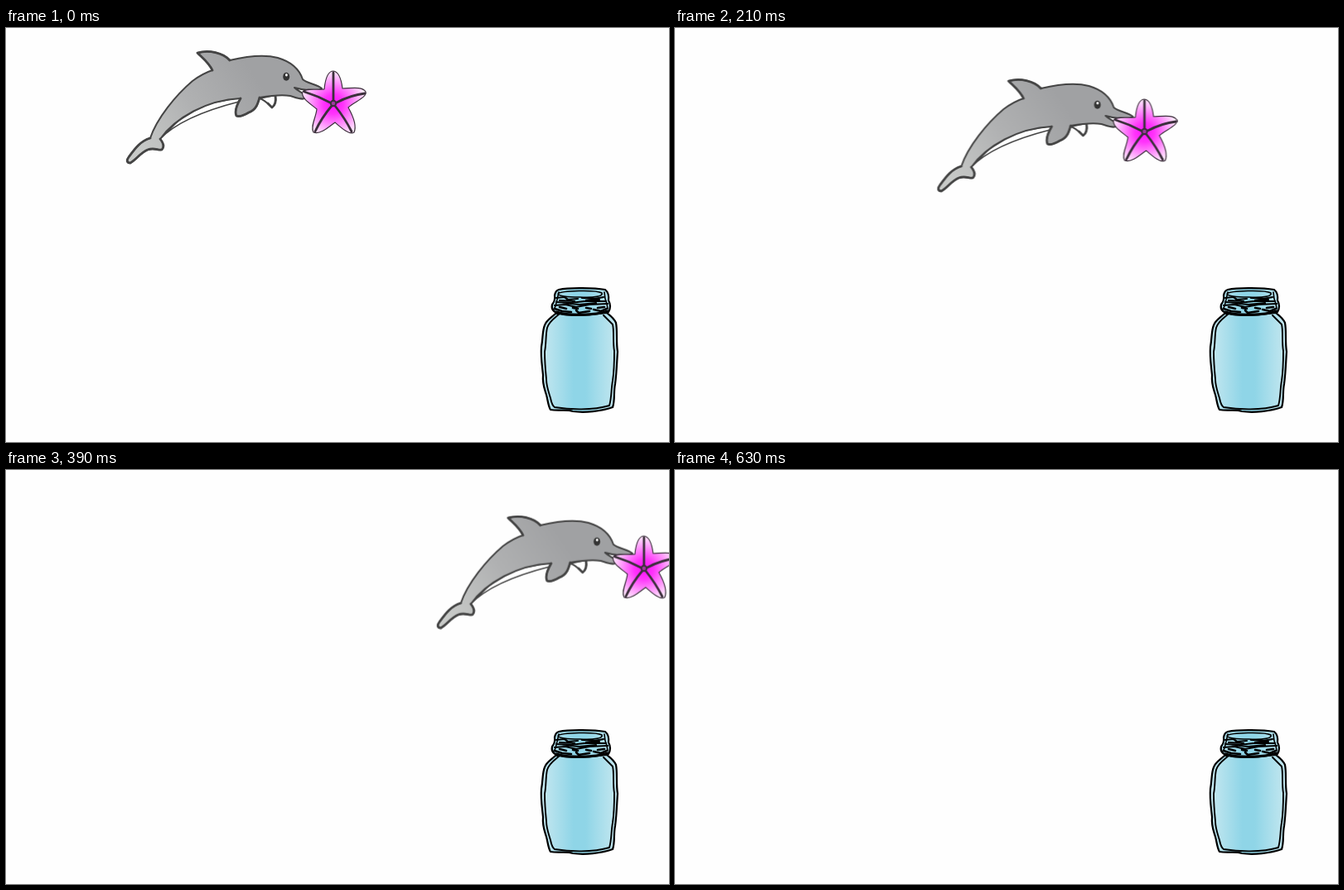
An HTML page without scripts that plays this animation: 800 by 500 pixels, repeating every 660 ms.

```html
<!DOCTYPE html>
<html lang="en">
<head>
<meta charset="utf-8">
<title>Dolphin and jar</title>
<style>
  html, body { margin: 0; width: 100%; height: 100%; overflow: hidden; background: #fefefe; }
  svg { display: block; width: 800px; height: 500px; }
  path { stroke-linecap: round; stroke-linejoin: round; }

  /* 22 steps of 30 ms: up, down, a short dip, then a long glide out */
  .leap { animation: leap 660ms infinite; }
  @keyframes leap {
    0%      { transform: translate(0, 0); animation-timing-function: steps(3, end); }
    13.636% { transform: translate(78px, -16.5px); animation-timing-function: steps(4, end); }
    31.818% { transform: translate(171.5px, 34px); animation-timing-function: steps(1, end); }
    36.363% { transform: translate(193px, 50px); animation-timing-function: steps(14, end); }
    100%    { transform: translate(702px, -12.3px); }
  }

  .dolphin { stroke: #444; stroke-width: 2; }
  .skin { fill: url(#skin); }
  .bold { fill: none; stroke-width: 2.8; }
  .white { fill: #fff; }
  .star { stroke: #3c2f3c; }
  .ribs { fill: none; stroke-width: 2.8; }
  .jar { stroke: #000; stroke-width: 2.2; fill: none; }
  .glass { fill: url(#glass); }
</style>
</head>
<body>
<svg viewBox="0 0 800 500">
  <defs>
    <linearGradient id="skin" gradientUnits="userSpaceOnUse" x1="160" y1="150" x2="300" y2="58">
      <stop offset="0" stop-color="#c8cac8"/>
      <stop offset=".5" stop-color="#b0b1b2"/>
      <stop offset="1" stop-color="#a0a1a3"/>
    </linearGradient>
    <radialGradient id="petal" gradientUnits="userSpaceOnUse" cx="395" cy="92" r="40">
      <stop offset="0" stop-color="#ff10ff"/>
      <stop offset=".3" stop-color="#ff35fb"/>
      <stop offset="1" stop-color="#fff0fd"/>
    </radialGradient>
    <linearGradient id="glass" gradientUnits="userSpaceOnUse" x1="646" y1="0" x2="738" y2="0">
      <stop offset="0" stop-color="#c6e8f0"/>
      <stop offset=".42" stop-color="#8fd5e7"/>
      <stop offset=".58" stop-color="#8fd5e7"/>
      <stop offset="1" stop-color="#c6e8f0"/>
    </linearGradient>
  </defs>

  <g class="jar">
    <path class="glass" d="M663 345C658 350 652 353 650 359C647 366 648 375 646 385C645 398 647 408 648 419C647 430 650 436 652 443C654 450 654 456 657 461C667 463 676 460 684 463C698 465 718 463 732 458C735 450 733 440 735 430C737 415 737 404 738 391C736 379 738 366 736 356C734 351 730 348 725 344Z"/>
    <path stroke-width="1.9" d="M667 346C661 351 655 355 653 362C651 371 652 381 650 391C650 403 651 414 652 424C652 433 655 440 657 447C658 452 659 456 662 458C680 461 708 462 728 456C731 446 730 437 732 426C734 413 734 400 734 390C732 379 734 366 732 358L721 347"/>
    <path class="glass" d="M667 316C680 313 711 314 723 316Q728 320 727 329Q731 336 727 343C714 346 683 349 667 345Q657 342 659 334Q663 329 662 323Q663 317 667 316Z"/>
    <path stroke-width="1.6" d="M666 321C670 317 712 316 719 320C721 324 710 326 692 325C676 325 667 324 666 321Z
      M667 319L665 328L663 336L661 340M722 319L723 327L725 333L726 339"/>
    <path stroke-width="2.2" d="M664 326L674 325L678 328L690 327M695 326L710 327L721 325M664 331L681 332L698 330L724 330
      M662 335L675 334L688 337L704 334L726 333M668 329L686 330M700 329L716 328M672 332L692 334L712 332"/>
    <path stroke-width="2.6" d="M662 339L671 342L682 343M688 341L691 344L704 342M709 340L718 342L725 339M668 337L676 339M684 338L690 339M700 338L706 339M714 338L722 337"/>
    <path stroke-width="3" d="M664 343C680 348 710 347 726 342"/>
  </g>

  <g class="leap">
    <g class="dolphin">
      <path class="white" d="M186 134C205 114 242 99 281 89L283 84L240 92L208 112Z" stroke-width="1.5"/>
      <path class="white" d="M306 85C313 87 317 93 321 96C325 93 326 87 325 81Z"/>
      <path class="bold" d="M316 91L321 96C325 93 326 88 325 82"/>
      <path class="white" d="M347 71L362 84L364 76Z" stroke-width="1.4"/>
      <path class="skin" d="M249 51C245 42 237 36 231 30C245 26 262 30 270 39C291 34 313 32 328 36C345 41 354 50 358 62C363 67 376 68 381 73C377 77 362 76 348 72C353 77 361 79 362 84C359 88 350 84 343 82C330 80 318 82 306 84C304 91 302 99 293 102C288 105 282 108 278 106C275 100 279 92 283 85C242 87 205 108 186 134C190 139 191 144 188 147C183 148 179 144 171 147C163 150 157 159 150 163C146 163 145 160 148 156C154 148 162 136 174 133C182 109 205 81 225 64Q237 55 249 51Z"/>
      <path class="bold" d="M249 51C245 42 237 36 231 30C245 26 262 30 270 39M306 84C304 91 302 99 293 102C288 105 282 108 278 106C275 100 279 92 283 85M186 134C190 139 191 144 188 147C183 148 179 144 171 147C163 150 157 159 150 163C146 163 145 160 148 156C154 148 162 136 174 133"/>
      <ellipse cx="338.2" cy="58.7" rx="4" ry="5" fill="#333" stroke="none"/>
      <ellipse cx="338.4" cy="56.8" rx="1.4" ry="1.8" fill="#fff" stroke="none"/>
    </g>
    <g class="star">
      <path fill="url(#petal)" stroke-width="1.2" d="M384 74C385 64 387 52 395 52C403 53 405 65 406 73C415 73 430 70 434 77C436 84 420 89 413 96C418 105 424 117 420 126C415 130 405 121 397 114C389 120 379 129 371 126C367 119 374 108 375 98C368 92 355 84 358 77C362 72 376 75 384 74Z"/>
      <path class="ribs" d="M395 54V88M399 90Q416 81 433 79M397 94Q409 109 417 125M393 94Q381 108 373 125M391 90Q376 82 360 77"/>
      <circle cx="395" cy="91" r="3.2" fill="#a03aa0" stroke-width="2"/>
    </g>
  </g>
</svg>
</body>
</html>
```
